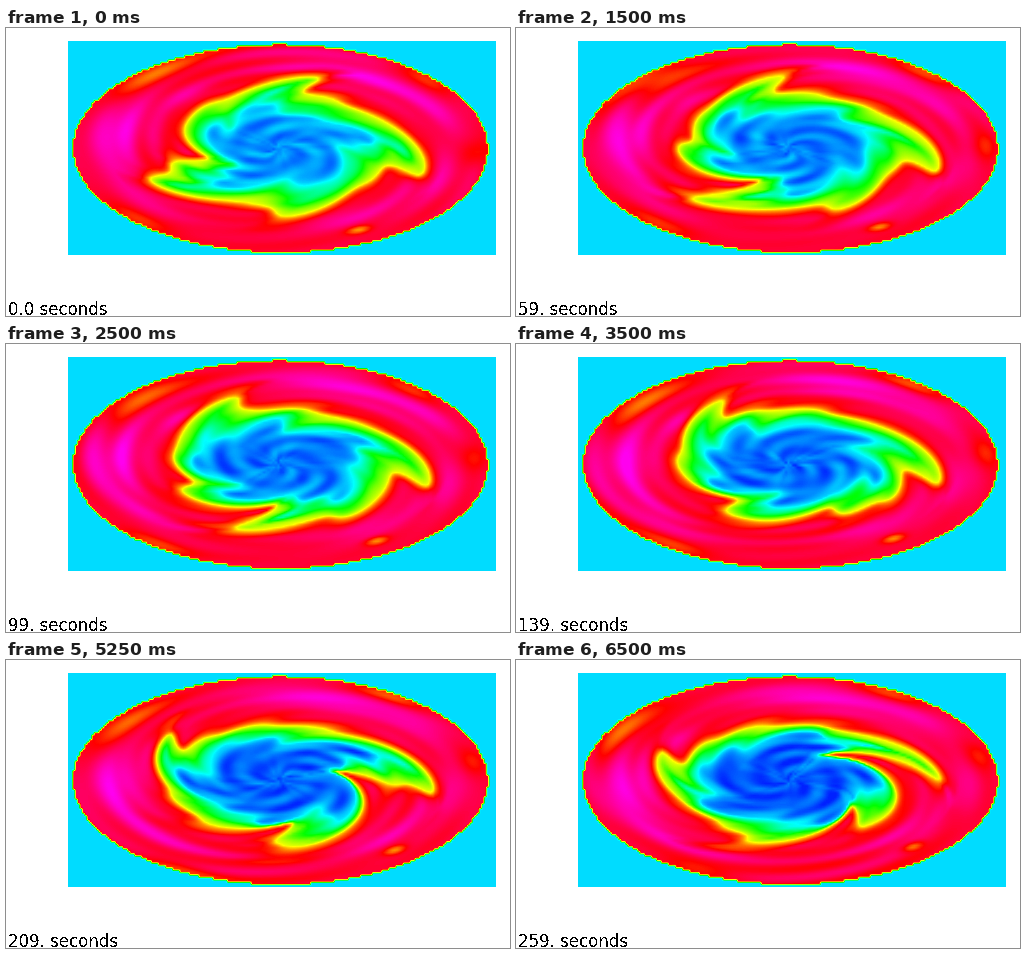
Recreate the animation shown at these times as a matplotlib script. Size 504 by 288 pixels, loop 8.5 s.

```python
import colorsys

import numpy as np
import matplotlib.pyplot as plt
from matplotlib.animation import FuncAnimation
from matplotlib.colors import ListedColormap

W, H, DPI = 504, 288, 100
LEFT, RIGHT, TOP, BOTTOM = 62, 490, 13, 227
COLS, ROWS = 180, 90
STEP_MS, FRAMES, LAST = 250, 34, 26
SKY = 188    # hue of the surrounding rectangle
REACH = 110  # typical radius of the cold vortex

# Cell centres, and polar coordinates that turn the ellipse into a circle
CELL = (RIGHT - LEFT) / COLS
gx, gy = np.meshgrid(LEFT + CELL * (np.arange(COLS) + 0.5),
                     TOP + CELL * (np.arange(ROWS) + 0.5))
disc = ((gx - 274.5) / 207.5) ** 2 + ((gy - 120.5) / 104) ** 2 <= 1
rho = np.hypot(gx - 273, 2 * (gy - 120))
theta = np.degrees(np.arctan2(2 * (120 - gy), gx - 273))

# Lobes and notches of the vortex: angle, turn per step, first and last height, width
LOBES = [
    (172, 7.7, -36, -58, 15),
    (120, 6.7, 0, -45, 14),
    (8, 1.0, 42, 46, 17),
    (228, 3.7, 32, 12, 18),
    (97, 3.4, 34, 30, 13),
    (288, 3.3, 26, 0, 17),
    (262, 0.7, 0, 24, 26),
]

# Patches of the warm ring: angle, radius, hue shift, angular and radial width
PATCHES = [
    (168, 165, -36, 24, 30),
    (210, 166, -24, 26, 16),
    (62, 168, -36, 30, 24),
    (25, 180, -18, 16, 22),
    (-22, 168, -22, 20, 25),
    (-63, 157, -24, 22, 16),
    (130, 138, -24, 14, 14),
    (131, 192, 38, 18, 14),
    (43, 200, 34, 12, 12),
    (226, 200, 24, 12, 12),
    (-3, 196, 20, 8, 14),
    (-64, 182, 50, 4, 7),
]

rng = np.random.default_rng(4)
MODES = [(m, rng.uniform(0.05, 0.2), rng.uniform(0, 6.28))
         for m in (1, 2, 3, 4, 5, 7)]


def bell(angle, centre, width):
    gap = (angle - centre + 180) % 360 - 180
    return np.exp(-(gap / width) ** 2)


def wave(count, angle, phase=0):
    return np.cos(count * np.radians(angle) + phase)


def distance(level):
    """Approximate distance in pixels to the zero line of a field."""
    dy, dx = np.gradient(level, CELL)
    return level / np.maximum(np.hypot(dx, dy), 1)


def hue_field(k):
    p = k / LAST
    # Outer parts lag behind, which bends lobes into spiral arms
    twist = 0.6 + 0.28 * p
    spiral = theta + twist * np.clip(rho - REACH, -55, 60)
    spin = spiral - 8 * k
    streaks = sum(np.sin(m * np.radians(spin) + n * rho + phase)
                  for m, n, phase in MODES) / 2

    rim = REACH + 2 * wave(11, spin)
    for angle, turn, h0, h1, width in LOBES:
        rim = rim + (h0 + p * (h1 - h0)) * bell(spiral, angle + turn * k, width)
    core = (68 + 16 * p + 0.4 * (rim - REACH)
            + 8 * wave(5, spin) + 6 * wave(8, spin, 1))
    a = distance(rim - rho)
    b = distance(np.minimum(core, rim - 8) - rho)

    # Warm ring, drifting slowly
    warm = -12 + 5 * streaks
    for angle, r, shift, wa, wr in PATCHES:
        warm = warm + (shift * bell(theta, angle + 0.65 * k, wa)
                       * np.exp(-((rho - r) / wr) ** 2))
    fade = np.exp(np.minimum(a, 0) / 4.5)
    outer = 60 * fade + np.clip(warm, -56, 40) * (1 - fade)

    # Cold vortex
    depth = np.maximum(a, 0)
    mix = depth / (depth + np.maximum(-b, 0) + 1e-3)
    cold = 1 - np.exp(-np.maximum(b, 0) / 7)
    inner = 60 + 127 * mix ** 0.85 + (22 + 14 * p) * cold
    inner += 7 * streaks * np.minimum(depth / 10, 1)

    hue = np.where(a > 0, inner, outer)
    return np.where(disc, np.clip(hue, -60, 232), SKY)


fields = [hue_field(k) for k in range(LAST + 1)]
rainbow = ListedColormap([colorsys.hsv_to_rgb(h % 360 / 360, 1, 1)
                          for h in range(-60, 241)])

fig = plt.figure(figsize=(W / DPI, H / DPI), dpi=DPI, facecolor="white")
ax = fig.add_axes([0, 0, 1, 1])
image = ax.imshow(fields[0], cmap=rainbow, vmin=-60, vmax=240,
                  extent=(LEFT, RIGHT, BOTTOM, TOP), aspect="auto",
                  interpolation="bilinear", interpolation_stage="data")
ax.set(xlim=(0, W), ylim=(H, 0))
ax.axis("off")
label = ax.text(2, 287, "", family="DejaVu Sans", fontsize=12,
                color="black", va="baseline", antialiased=False)


def update(frame):
    k = min(frame, LAST)
    image.set_data(fields[k])
    label.set_text(f"{10 * k - 1}. seconds" if k else "0.0 seconds")
    return image, label


anim = FuncAnimation(fig, update, frames=FRAMES, interval=STEP_MS,
                     repeat=True, repeat_delay=0, blit=False)
plt.show()
```
